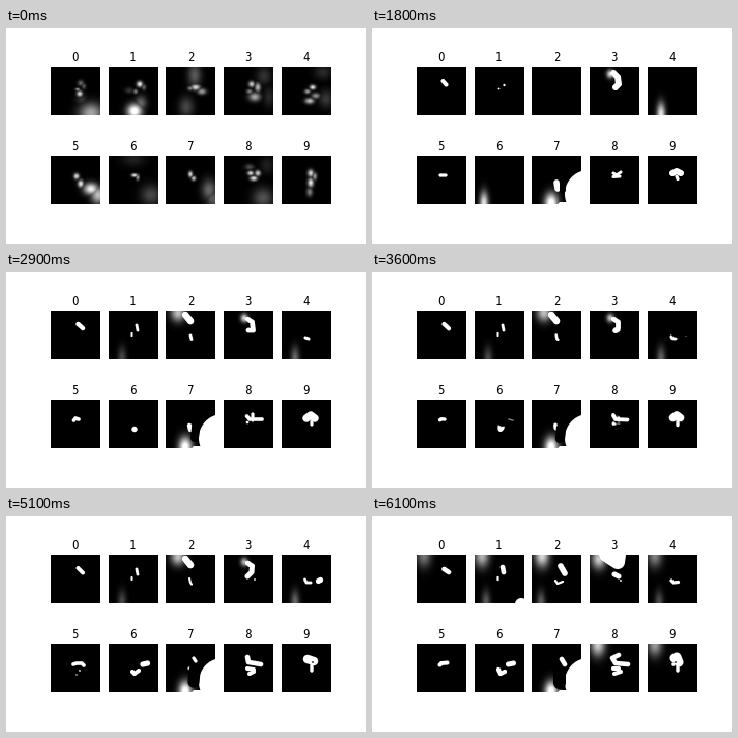
A matplotlib script that plays this animation: 360x216 px, repeating every 7200 ms.

```python
import numpy as np
import matplotlib.pyplot as plt
from matplotlib.animation import FuncAnimation

SIZE = 48
FRAMES, INTERVAL = 72, 100
KEY_FRAMES = [12, 18, 29, 42, 51, 61]
REACH = 3.0  # distance beyond which shapes no longer influence a morph

Y, X = np.mgrid[0:SIZE, 0:SIZE] + 0.5


def glow(x, y, sx, sy, level):
    """Soft elliptical light."""
    falloff = ((X - x) / sx) ** 2 + ((Y - y) / sy) ** 2
    return "glow", level * np.exp(-falloff / 2)


def chain_distance(radius, coords):
    pts = np.reshape(coords, (-1, 2)).astype(float)
    if len(pts) == 1:
        pts = np.vstack([pts, pts])
    best = np.full(X.shape, np.inf)
    for (ax, ay), (bx, by) in zip(pts[:-1], pts[1:]):
        dx, dy = bx - ax, by - ay
        along = ((X - ax) * dx + (Y - ay) * dy) / max(dx * dx + dy * dy, 1e-9)
        along = np.clip(along, 0, 1)
        best = np.minimum(best, np.hypot(X - ax - along * dx, Y - ay - along * dy))
    return best - radius


def blob(radius, *coords):
    """Rounded white stroke through the given points."""
    return "blob", chain_distance(radius, coords)


def hole(radius, *coords):
    """Rounded black stroke cut out of everything else."""
    return "hole", chain_distance(radius, coords)


def compose(shapes):
    solid = np.full(X.shape, REACH)
    cut = np.full(X.shape, REACH)
    light = np.zeros(X.shape)
    for kind, field in shapes:
        if kind == "blob":
            solid = np.minimum(solid, field)
        elif kind == "hole":
            cut = np.minimum(cut, field)
        else:
            light = np.maximum(light, field)
    return np.stack([np.clip(solid, -REACH, REACH),
                     np.clip(cut, -REACH, REACH), light])


def render(fields):
    solid, cut, light = fields
    white = np.maximum(np.clip(0.5 - solid, 0, 1), light)
    return np.clip(white, 0, 1) * np.clip(0.5 + cut, 0, 1)


# Opening picture of every panel: dim lights around a few bright specks.
OPENING = [
    [glow(39, 46, 8, 7, .65), glow(30, 33, 4, 4, .2), glow(29, 17, 2, 2, .4),
     glow(28, 27, 2, 2, .85), glow(32, 20, 1.5, 2, .35), glow(26, 23, 1.5, 1, .6)],
    [glow(25, 44, 5, 5, 1.1), glow(31, 36, 4, 5, .4), glow(30, 18, 2, 2, .95),
     glow(26, 25, 1.5, 1.5, .5), glow(20, 24, 3, 2, .2), glow(34, 21, 1.5, 2, .4)],
    [glow(28, 9, 4.5, 8, .35), glow(29, 21, 3, 2, .85), glow(35, 25, 3, 2, .6),
     glow(24, 22, 2, 1.5, .5), glow(20, 40, 5, 7, .28)],
    [glow(27, 18, 2, 2, .8), glow(33, 21, 2, 3, .7), glow(30, 30, 4, 3, .65),
     glow(25, 25, 2, 1.5, .5), glow(39, 10, 5, 6, .2), glow(44, 30, 4, 7, .15)],
    [glow(30, 21, 2, 1.6, .9), glow(25, 25, 2, 1.5, .6), glow(33, 29, 3, 2, .55),
     glow(27, 34, 3, 2, .75), glow(40, 6, 6, 5, .16), glow(43, 32, 5, 6, .22)],
    [glow(25, 21, 1.8, 2, .85), glow(29, 28, 2, 2.5, .9), glow(39, 33, 5, 4, .95),
     glow(46, 39, 5, 6, .75)],
    [glow(25, 20, 2, 1.2, .9), glow(28, 22, 1.2, 2, .6), glow(24, 4, 8, 5, .13),
     glow(41, 39, 7, 7, .28)],
    [glow(24, 19, 1.4, 2, .85), glow(27, 23, 1.5, 1.5, .8),
     glow(42, 34, 5, 7, .4), glow(46, 43, 5, 6, .35)],
    [glow(26, 18, 2, 1.6, .85), glow(33, 18, 2, 2, .8), glow(29, 23, 2.5, 1.6, .9),
     glow(25, 12, 3, 2, .3), glow(38, 42, 7, 7, .32), glow(42, 10, 5, 6, .12)],
    [glow(28, 18, 2, 2.5, .85), glow(32, 21, 1.5, 2.5, .6),
     glow(28, 27, 2, 3, .9), glow(27, 36, 2, 3, .5)],
]


def arch(radius, *coords, light=.85):
    return [blob(radius, *coords), glow(20, 8, 2.5, 3, light)]


def corner(level, x=7, y=2):
    return glow(x, y, 5, 8, level)


def foot(level, x=13):
    return glow(x, 47, 3, 8, level)


def wing(*extra):
    return [blob(23, 55, 38), blob(3, 28, 49, 40, 49),
            glow(19, 47, 4.5, 7, 1.1), *extra]


SHOULDER = [blob(3.3, 19, 5, 24, 11), glow(12, 3, 5, 6, .75)]
TWO_MARKS = [blob(1, 22.5, 23, 22.5, 25), blob(1.4, 27, 15, 28, 20), foot(.28)]

# Panel states at KEY_FRAMES.
STATES = [
    [[blob(1.4, 26.5, 18.5)],
     [blob(2, 25.5, 15, 28.5, 18.5)],
     [blob(2.2, 26.5, 14, 31, 18)],
     [blob(2, 26.5, 14, 31, 18.5)],
     [blob(2, 26.5, 14, 31, 18.5)],
     [blob(2.3, 26.5, 15, 31, 18), corner(.45)]],
    [[blob(.7, 27, 18.5)],
     [blob(.9, 23.5, 22.5), blob(1.1, 28.5, 19)],
     TWO_MARKS, TWO_MARKS, TWO_MARKS,
     [blob(2.3, 27, 13, 28, 18), blob(1.1, 22.5, 23, 22.5, 25),
      blob(6, 45, 49), corner(.7), foot(.35, 11)]],
    [[], [],
     SHOULDER + [blob(1.4, 24, 25, 25, 28.5)],
     SHOULDER + [blob(1.2, 23.5, 24, 24, 28, 25.5, 29)],
     SHOULDER + [blob(1, 23, 24, 24, 28, 25, 29.5)],
     [blob(2.8, 28, 12, 32, 19), blob(1.1, 23, 26, 25, 29, 30, 27),
      corner(.85, 10), foot(.35, 9)]],
    [arch(2.5, 23, 9, 27, 10, 28.5, 17, 25, 20),
     arch(3, 23, 7, 27, 11, 28, 18, 25, 21),
     arch(2.4, 23, 9, 27.5, 12, 28.5, 20, 24, 20),
     arch(2.4, 23, 9, 27.5, 12, 27, 17, 25, 21, light=.7),
     arch(2.5, 23, 9, 27.5, 12, 27, 18, 23, 22, light=.7) + [blob(.8, 30, 25)],
     [blob(7, 16, 1, 27, 8, 28, 1), blob(2.5, 24, 20, 28, 22),
      blob(.9, 30, 26), glow(9, 5, 5, 7, .8)]],
    [[glow(14, 47, 3.5, 8, 1)],
     [foot(.9)],
     [blob(1.5, 23, 27, 26, 28), foot(.4)],
     [blob(1.4, 22.5, 25, 24, 28, 28, 28), blob(2.6, 37, 25.5), foot(.35)],
     [blob(1.4, 22.5, 25, 24, 28, 28, 28), blob(2.6, 35.5, 26.5, 37.5, 25.5), foot(.4)],
     [blob(1.6, 23, 26, 25, 28, 29.5, 27.5), corner(.5), foot(.3, 11)]],
    [[blob(1.6, 24, 20, 28, 18)],
     [blob(1.6, 23, 20, 28, 20)],
     [blob(1.8, 22.5, 21, 24, 19, 27, 20)],
     [blob(1.5, 22.5, 20.5, 27, 20)],
     [blob(1.8, 22, 21, 25, 20, 30, 20, 32, 22), blob(.6, 25, 31), blob(.8, 28, 27)],
     [blob(2, 22.5, 21.5, 24, 20, 29.5, 19.5)]],
    [[],
     [foot(.9, 9)],
     [blob(2.7, 25, 29.5)],
     [blob(2.8, 33, 20, 37, 21), blob(1.8, 23, 26, 25, 30, 29, 27)],
     [blob(2.6, 33, 21, 37.5, 20), blob(2, 23, 28, 25, 30, 29, 27)],
     [blob(2.5, 32.5, 21, 37.5, 20), blob(2.1, 23, 26, 25, 30, 29, 28)]],
    [[blob(30.5, 44, 46), hole(2, 30, 21, 30, 26), glow(14, 45, 3, 8, .8)],
     wing(blob(2.8, 24, 27, 25, 33), hole(3, 30, 27, 30, 34)),
     wing(blob(2.2, 23, 26, 24, 30), hole(4, 29, 28, 28, 38)),
     wing(blob(1.6, 23, 25, 23, 28), blob(1, 27, 16), hole(5.2, 28, 29, 27, 39)),
     wing(blob(1.5, 23, 25), blob(1.6, 27, 15, 29, 18), hole(5.6, 28, 27, 27, 38)),
     wing(blob(2.3, 29, 16, 32, 21), hole(6, 27, 28, 27, 39))],
    [[blob(2, 25, 19, 29, 17.5)],
     [blob(1.5, 23, 18, 26, 20, 30, 17), blob(1.5, 29, 21, 23, 21.5)],
     [blob(1.8, 22.5, 17, 25, 20, 37, 20), blob(1.6, 28, 15, 28, 21), blob(1.3, 23, 23)],
     [blob(2, 23, 15, 25, 20, 36, 21), blob(2, 29, 25, 23, 25), blob(2, 24, 30, 29, 28)],
     [blob(2.3, 23, 14, 24, 19, 36, 21), blob(2, 29, 26, 23, 25), blob(2, 25, 30, 29, 28)],
     [blob(2.3, 28, 12, 22, 15, 25, 20, 37, 21), blob(2, 28, 25, 23, 25),
      blob(2, 24, 30, 30, 28), corner(.8, 8)]],
    [[blob(2.1, 26, 19, 29, 17.5)],
     [blob(3, 24, 18, 28, 16, 32, 18), blob(1.6, 28, 21, 29, 23.5)],
     [blob(3.7, 24, 19, 28, 16, 32, 19), blob(1.6, 29, 22, 29, 25)],
     [blob(4, 25, 18, 28, 16, 31, 18), blob(1.7, 29, 22, 29, 26)],
     [blob(4.2, 25, 16, 28, 17, 31, 18), blob(1.7, 29, 22, 29, 27), hole(.8, 30, 19)],
     [blob(4.5, 26, 15, 28, 14, 30, 19), blob(1.8, 25, 21), blob(1.7, 29, 23, 29, 27),
      hole(.8, 27, 19), corner(.6)]],
]

opening = [render(compose(shapes)) for shapes in OPENING]
states = [[compose(shapes) for shapes in row] for row in STATES]


def panel_image(digit, frame):
    if frame < KEY_FRAMES[0]:
        return opening[digit]
    position = np.interp(frame, KEY_FRAMES, range(len(KEY_FRAMES)))
    index = min(int(position), len(KEY_FRAMES) - 2)
    mix = position - index
    before, after = states[digit][index:index + 2]
    return render((1 - mix) * before + mix * after)


plt.rcParams.update({"font.family": "DejaVu Sans", "font.size": 10})
fig, axes = plt.subplots(2, 5, figsize=(5, 3), dpi=72, facecolor="white")
fig.subplots_adjust(left=.125, right=.9, bottom=.125, top=.88, wspace=.2, hspace=.2)

panels = []
for digit, ax in enumerate(axes.flat):
    panels.append(ax.imshow(opening[digit], cmap="gray", vmin=0, vmax=1,
                            interpolation="nearest"))
    ax.set_title(str(digit), fontsize=12)
    ax.axis("off")


def update(frame):
    for digit, panel in enumerate(panels):
        panel.set_data(panel_image(digit, frame))
    return panels


anim = FuncAnimation(fig, update, frames=FRAMES, interval=INTERVAL,
                     repeat=True, repeat_delay=0, blit=False)
plt.show()
```
